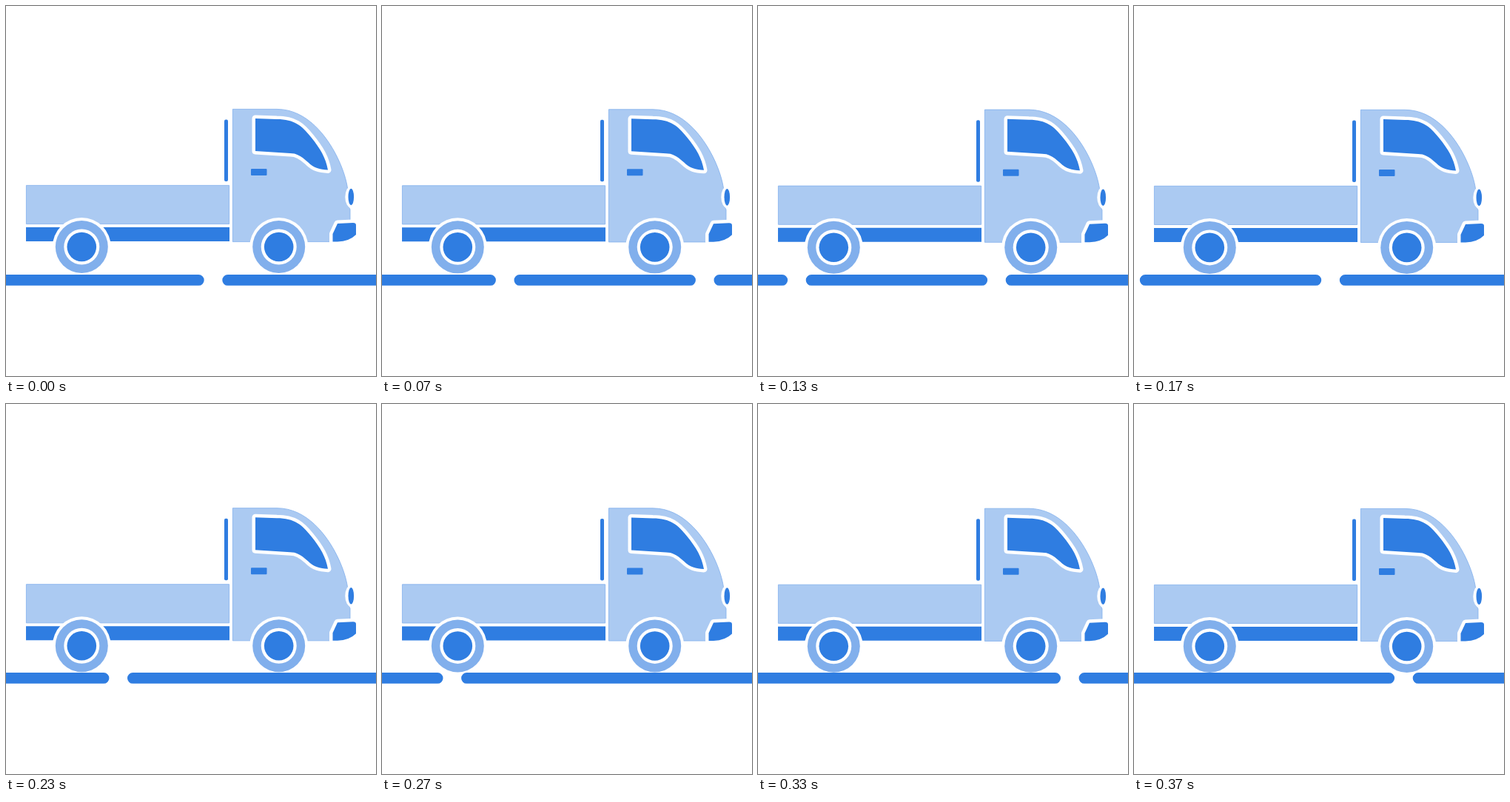
An HTML page for the animation above (0.41 s loop, 500 by 500 pixels).

```html
<!DOCTYPE html>
<html lang="en">
<head>
<meta charset="utf-8">
<title>Driving truck</title>
<style>
  html, body { margin: 0; width: 100%; height: 100%; overflow: hidden; background: #fff; }
  svg { display: block; width: 100vw; height: 100vh; }
  .dark { fill: #2f7de1; }
  .mid { fill: #81afec; }
  .light { fill: #abcaf2; stroke: #81afec; stroke-width: .8; }
  .cut { stroke: #fff; stroke-width: 9; stroke-linejoin: round; paint-order: stroke; }
  #road { fill: none; stroke: #2f7de1; stroke-width: 14.8; stroke-linecap: round; }
</style>
</head>
<body>
<svg viewBox="0 0 500 500">
  <defs>
    <g id="wheel">
      <circle r="39.5" fill="#fff"/>
      <circle r="35.5" class="mid"/>
      <circle r="24" fill="#fff"/>
      <circle r="19.8" class="dark"/>
    </g>
  </defs>
  <g id="truck">
    <path class="light" d="M27.4 242.4H301.6V294.6H27.4Z"/>
    <path class="dark" d="M27 299H302V318H27Z"/>
    <rect class="dark" x="295" y="153.5" width="5" height="83.5" rx="2"/>
    <path class="light" d="M306.4 139.4H366C407 139.4 434 177 447 203C456 221 460 236 461.5 246L465 275V290L441 318.6H306.4Z"/>
    <path class="dark cut" d="M337 152L366 153C390 153 400 162 412 177C425 193 432 205 435 221.5C424 221 416 219 408 211C398 202 392 199 384 199L337 196Z"/>
    <rect class="dark" x="331" y="220" width="21.5" height="9" rx="1"/>
    <ellipse cx="466.3" cy="258" rx="8" ry="14.5" fill="#fff"/>
    <path fill="#fff" d="M461 268L466 275V262Z"/>
    <ellipse class="dark" cx="466.3" cy="258" rx="3.8" ry="11.3"/>
    <path class="dark cut" d="M448 294L469 293Q473 293 473 296V309Q464 318 448 318.5H441.5V308Z"/>
    <use href="#wheel" x="102.3" y="325.5"/>
    <use href="#wheel" x="368.7" y="325.5"/>
  </g>
  <path id="road" d="M-100 370.4H260.3M299.7 370.4H530.3M569.7 370.4H970.6M1010 370.4H1300"/>
</svg>
<script>
  const LOOP = 410, LAST_STEP = 11;
  const truck = document.getElementById('truck');
  const road = document.getElementById('road');

  // Thirty steps per second, with changes on 10 ms ticks
  function draw(now) {
    const tick = Math.floor(now % LOOP / 10);
    const step = Math.min(LAST_STEP, Math.floor((tick + 0.5) * 0.3));
    truck.setAttribute('transform', `translate(0 ${step * 0.18})`);
    road.setAttribute('transform', `translate(${step * -56.9} 0)`);
    requestAnimationFrame(draw);
  }
  draw(performance.now());
</script>
</body>
</html>
```
